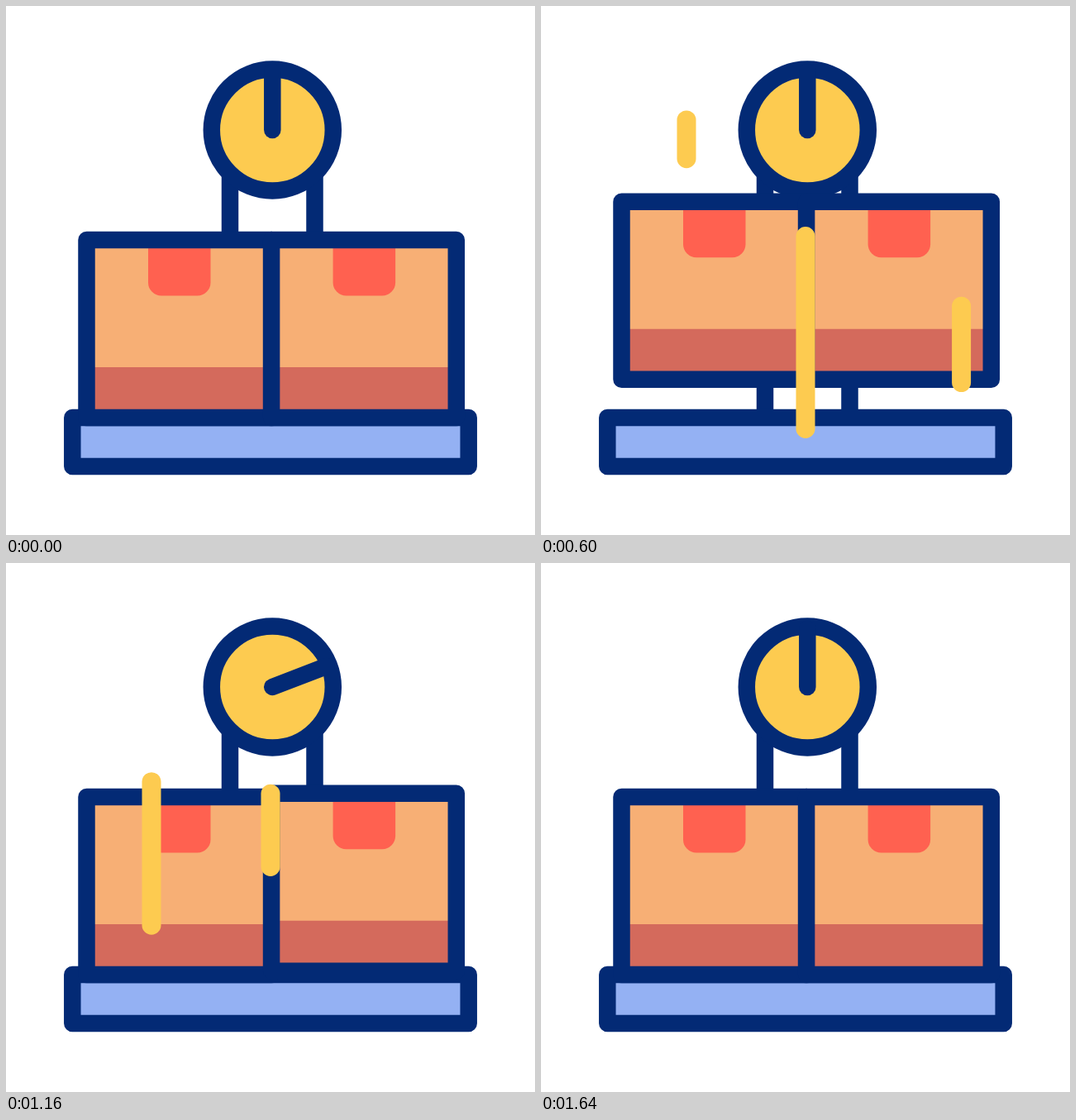
An HTML page that plays this animation: 640x640 px, repeating every 2200 ms.

```html
<!DOCTYPE html>
<html lang="en">
<head>
<meta charset="utf-8">
<title>Weighing scale</title>
<style>
  html, body { margin: 0; width: 100%; height: 100%; overflow: hidden; background: #fff; }
  svg { display: block; width: 100%; height: 100%; }
  .ink { stroke: #032a75; stroke-width: 20.5; stroke-linecap: round; stroke-linejoin: round; }
  .streak { stroke: #fdcb50; stroke-width: 23; stroke-linecap: round; }
</style>
</head>
<body>
<svg viewBox="0 0 640 640">
  <defs>
    <g id="box">
      <path fill="#f7af75" d="M97.5 283h224v215h-224z"/>
      <path fill="#d46a5c" d="M97.5 437h224v61h-224z"/>
      <path fill="#ff6150" d="M172 283h75.5v51.500a16 16 0 0 1-16 16h-43.500a16 16 0 0 1-16-16z"/>
      <path class="ink" fill="none" d="M97.500 283h223.700v215h-223.700z"/>
    </g>
  </defs>
  <path class="ink" fill="none" d="M271 200V498M373.500 200V498"/>
  <circle class="ink" cx="322.300" cy="150" r="73.500" fill="#fdcb50"/>
  <path class="ink" id="needle" d="M322.300 150V80"/>
  <path class="ink" fill="#94b1f3" d="M80.300 498H559.700V557H80.300z"/>
  <use href="#box" id="left"/>
  <use href="#box" id="right"/>
  <g id="streaks"></g>
</svg>
<script>
  const LOOP = 2200, STEP = 40, LIFT = 46.3;
  const $ = id => document.getElementById(id);

  const progress = (t, [from, to]) => Math.min(1, Math.max(0, (t - from) / (to - from)));
  const smooth = p => p * p * (3 - 2 * p);
  const ease = (t, span) => smooth(progress(t, span));
  const spin = (t, span) => {
    const p = progress(t, span);
    return 360 * (0.8 * smooth(p) + 0.2 * p);
  };

  // Each pass is [head span, tail span] along the line.
  const streaks = [
    { x: 176, top: 138, bottom: 467.5,
      up: [[135, 382], [342, 680]], down: [[845, 1231], [997, 1383]] },
    { x: 320, top: 278.5, bottom: 534.5,
      up: [[302, 602], [537, 877]], down: [[1010, 1388], [1148, 1528]] },
    { x: 508.6, top: 186.5, bottom: 455.5,
      up: [[470, 800], [622, 962]], down: [[1160, 1540], [1268, 1638]] }
  ];

  for (const s of streaks) {
    s.el = document.createElementNS("http://www.w3.org/2000/svg", "path");
    s.el.setAttribute("class", "streak");
    $("streaks").append(s.el);
  }

  function drawStreak(s, t) {
    const rising = t < s.down[0][0];
    const [head, tail] = (rising ? s.up : s.down).map(span => ease(t, span));
    const [from, to] = rising ? [s.bottom, s.top] : [s.top, s.bottom];
    const at = p => from + (to - from) * p;
    const visible = head - tail > 0.001;
    s.el.setAttribute("d", visible ? `M${s.x} ${at(tail)}V${at(head)}` : "");
  }

  function drawBox(id, x, t, up, down) {
    const y = -LIFT * (ease(t, up) - ease(t, down));
    $(id).setAttribute("transform", `translate(${x} ${y})`);
  }

  function draw(t) {
    drawBox("left", 0, t, [40, 280], [865, 1105]);
    drawBox("right", 223.6, t, [140, 380], [965, 1205]);
    const angle = spin(t, [1000, 1604]) - spin(t, [0, 560]);
    $("needle").setAttribute("transform", `rotate(${angle} 322.3 150)`);
    streaks.forEach(s => drawStreak(s, t));
  }

  const start = performance.now();
  function tick() {
    const t = (performance.now() - start) % LOOP;
    draw(Math.floor(t / STEP) * STEP);
    requestAnimationFrame(tick);
  }
  tick();
</script>
</body>
</html>
```
